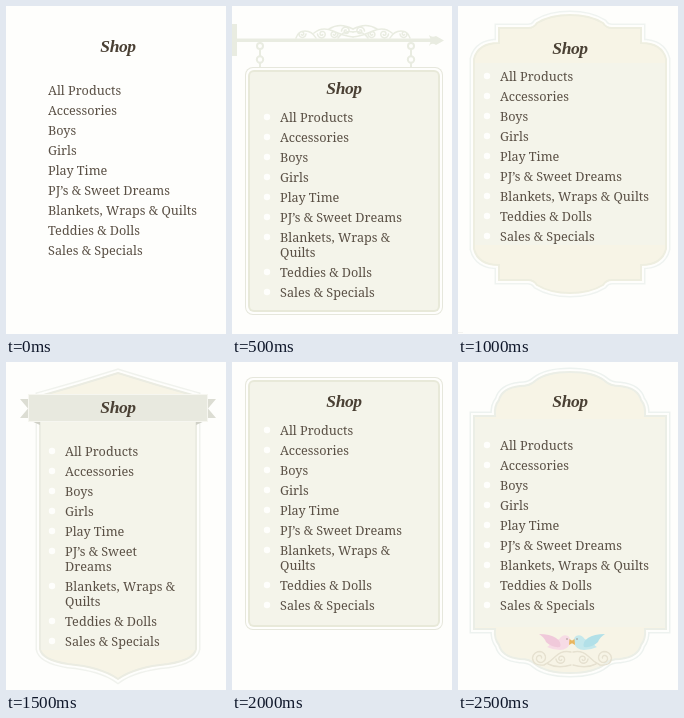
Write an HTML page that moves like this. It is 220 px wide and 328 px high and loops after 3 s.

```html
<!DOCTYPE html>
<html lang="en">
<head>
<meta charset="utf-8">
<title>Shop menu styles</title>
<style>
  html, body { margin: 0; width: 100%; height: 100%; overflow: hidden; background: #fefefc; }
  svg { display: block; width: 220px; height: 328px; }
  .scene { opacity: 0; }
  .scene:first-of-type { opacity: 1; }
  .title { font: italic bold 17.5px "Liberation Serif", serif; letter-spacing: -.4px; text-anchor: middle; fill: #4a4034; }
  .item { font: 12.65px "Noto Serif", serif; fill: #5a5045; }
  .line { fill: none; stroke-linecap: round; stroke-linejoin: round; }
</style>
</head>
<body>
<svg id="stage" viewBox="0 0 220 328"></svg>
<script>
const PAPER = '#fefefc', SAGE = '#f4f4ea', CREAM = '#f7f4e6', IRON = '#e9ece1';
const LOOP = 3000;
const ITEMS = ['All Products', 'Accessories', 'Boys', 'Girls', 'Play Time',
  'PJ’s & Sweet Dreams', 'Blankets, Wraps & Quilts', 'Teddies & Dolls', 'Sales & Specials'];

const rect = (x, y, w, h, fill, r = 0) =>
  `<rect x="${x}" y="${y}" width="${w}" height="${h}" rx="${r}" fill="${fill}"/>`;
const dot = (x, y, r, fill) => `<circle cx="${x}" cy="${y}" r="${r}" fill="${fill}"/>`;
const ring = (x, y, r, color, w) =>
  `<circle class="line" cx="${x}" cy="${y}" r="${r}" stroke="${color}" stroke-width="${w}"/>`;
const shape = (d, fill) => `<path d="${d}" fill="${fill}"/>`;
const line = (d, color, w) => `<path class="line" d="${d}" stroke="${color}" stroke-width="${w}"/>`;
const mirror = (art, cx) => `<g transform="translate(${2 * cx}) scale(-1 1)">${art}</g>`;
const pair = (art, cx) => art + mirror(art, cx);

// Menu: heading, bullets and items; wraps maps an item to its broken form.
function menu(titleY, x, y, wraps = {}) {
  let out = `<text class="title" x="112" y="${titleY + 6}">Shop</text>`;
  for (const item of ITEMS) {
    out += dot(x - 13, y, 3.2, PAPER);
    (wraps[item] || item).split('|').forEach((part, i) => {
      if (i) y += 15;
      out += `<text class="item" x="${x}" y="${y + 4.5}">${part.replace('&', '&amp;')}</text>`;
    });
    y += 20;
  }
  return out;
}

// Chain of quadratic curves: start, control, end, control, end...
function curve(pts) {
  let d = 'M' + pts[0];
  for (let i = 1; i < pts.length; i += 2) d += `Q${pts[i]} ${pts[i + 1]}`;
  return d;
}
const flipX = pts => pts.map(([x, y]) => [224 - x, y]).reverse();
const wholeWidth = left => [...left, ...flipX(left).slice(1)];

// Closed outline from its upper left quarter.
function fourfold(quarter, cy) {
  const top = wholeWidth(quarter);
  const bottom = top.map(([x, y]) => [x, 2 * cy - y]).reverse();
  return curve([...top, ...bottom.slice(1)]) + 'Z';
}

function plaque(d, rim, edge) {
  const layer = (color, w) => `<path d="${d}" fill="${CREAM}" stroke="${color}" stroke-width="${w}"/>`;
  return layer(edge, 9) + layer(PAPER, 6) + layer(rim, 2);
}

function board(y, h) {
  const box = (inset, fill, r) => rect(13 + inset, y + inset, 198 - 2 * inset, h - 2 * inset, fill, r);
  return box(0, '#e6e7dc', 8) + box(1, PAPER, 7) + box(3, '#e8e9d9', 6) + box(5, SAGE, 4);
}

function spiral(cx, cy, r, from, turns) {
  const n = 24;
  return Array.from({ length: n + 1 }, (_, i) => {
    const k = i / n, a = from + turns * 2 * Math.PI * k, q = r * (1 - .8 * k);
    return (i ? 'L' : 'M') + (cx + q * Math.cos(a)).toFixed(1) + ' ' + (cy + q * Math.sin(a)).toFixed(1);
  }).join('');
}

function bracket() {
  const scroll = line(
    'M64 32Q66 25 73 25T84 32M82 27Q90 20 101 25T121 31M97 23Q108 16 121 23M106 32Q112 24 121 26' +
    spiral(70, 28, 4, 0, 1.4) + spiral(90, 28, 4.5, Math.PI, -1.4) +
    spiral(102, 28, 4, 0, 1.4) + spiral(114, 25, 4.5, Math.PI, 1.3), IRON, 1.5);
  const hook = x => line(`M${x} 43V50`, IRON, 2) + ring(x, 40, 3, IRON, 2) +
    ring(x, 53.5, 3.2, IRON, 2) + line(`M${x} 57V61`, IRON, 2);
  return rect(0, 18, 5, 32, IRON) + rect(5, 32.5, 195, 3.5, IRON) +
    shape('M197 29Q200 32 204 30L212 34.5L204 39Q200 36 197 40L199 34.5Z', IRON) +
    pair(scroll, 121) + hook(28) + hook(179);
}

function ribbon() {
  const tail = shape('M14 37H34V56H14L22 46.5Z', '#dcddd3') + shape('M23 58L34 63V58Z', '#cfd0c6');
  return pair(tail, 112) + rect(22, 32, 180, 28, '#f6f6f0') + rect(23, 33, 178, 26, '#e8e9df');
}

function bird(body, wing) {
  return shape('M92 279Q100 280 103 275Q106 272 110 274Q113 276 112 281Q110 288 102 288Q95 288 89 285Q93 283 92 279Z', body) +
    shape('M81 272Q92 272 98 276Q104 280 102 285Q94 286 88 280Q86 275 81 272Z', wing) +
    dot(109, 277, .7, '#8b7c76') + shape('M111.5 277L116 280L111 283Z', '#e9b65f');
}

function birds() {
  const flourish = line('M113 290Q104 288 98 294T86 303Q75 304 74.5 296' +
    spiral(82, 296, 7.5, Math.PI, 1.5) + spiral(103, 297, 5, Math.PI, -1.4) +
    'M90 302Q100 307 113 303', '#e6e1d0', 1.4);
  return pair(flourish, 114) + bird('#f7dbe5', '#f0c9da') + mirror(bird('#c5e8ec', '#b2e0e8'), 114);
}

const label = fourfold([
  [16, 148], [16, 98], [16, 53], [20, 37], [41, 37], [41, 30], [41, 22],
  [55, 22], [70, 22], [76, 22], [79, 17], [92, 9], [112, 9]], 148);

const crest = fourfold([
  [16, 160.5], [16, 108], [16, 54], [26, 54], [37, 54], [36, 44], [41, 38],
  [44, 26], [62, 24], [72, 24], [77, 19], [88, 10], [112, 10]], 160.5);

const pennant = (() => {
  const top = wholeWidth([[34, 160], [34, 90], [34, 34], [74, 23], [112, 11]]);
  const base = wholeWidth([[34, 160], [34, 230], [34, 287], [36, 298], [62, 302], [95, 305], [112, 317]]);
  return curve([...top, ...base.reverse().slice(1)]) + 'Z';
})();

const wrapQuilts = { 'Blankets, Wraps & Quilts': 'Blankets, Wraps &|Quilts' };
const wrapBoth = { ...wrapQuilts, 'PJ’s & Sweet Dreams': 'PJ’s & Sweet|Dreams' };

const scenes = [
  menu(40, 42, 84),
  bracket() + board(61, 248) + menu(82, 48, 111, wrapQuilts),
  plaque(label, '#eeeee0', '#eff3f0') + rect(17, 57, 190, 182, SAGE) +
    rect(0, 326, 5, 1, '#f3f3f0') + menu(41.5, 42, 70),
  plaque(pennant, '#ebece2', '#f0f2ed') + rect(35, 60, 154, 228, SAGE) +
    ribbon() + menu(45, 59, 89, wrapBoth),
  board(15, 253) + menu(39, 48, 68, wrapQuilts),
  plaque(crest, '#ebeee6', '#edf2ef') + rect(17, 57, 190, 208, SAGE) +
    birds() + menu(39, 42, 83)
];

const stage = document.getElementById('stage');
stage.innerHTML = rect(0, 0, 220, 328, PAPER) +
  scenes.map(art => `<g class="scene">${art}</g>`).join('');

// Each scene is opaque only during its own step of the loop.
stage.querySelectorAll('.scene').forEach((scene, i) => {
  const n = scenes.length;
  const frames = Array.from({ length: n + 1 }, (_, k) =>
    ({ offset: k / n, opacity: k === i ? 1 : 0, easing: 'step-end' }));
  scene.animate(frames, { duration: LOOP, iterations: Infinity });
});
</script>
</body>
</html>
```
